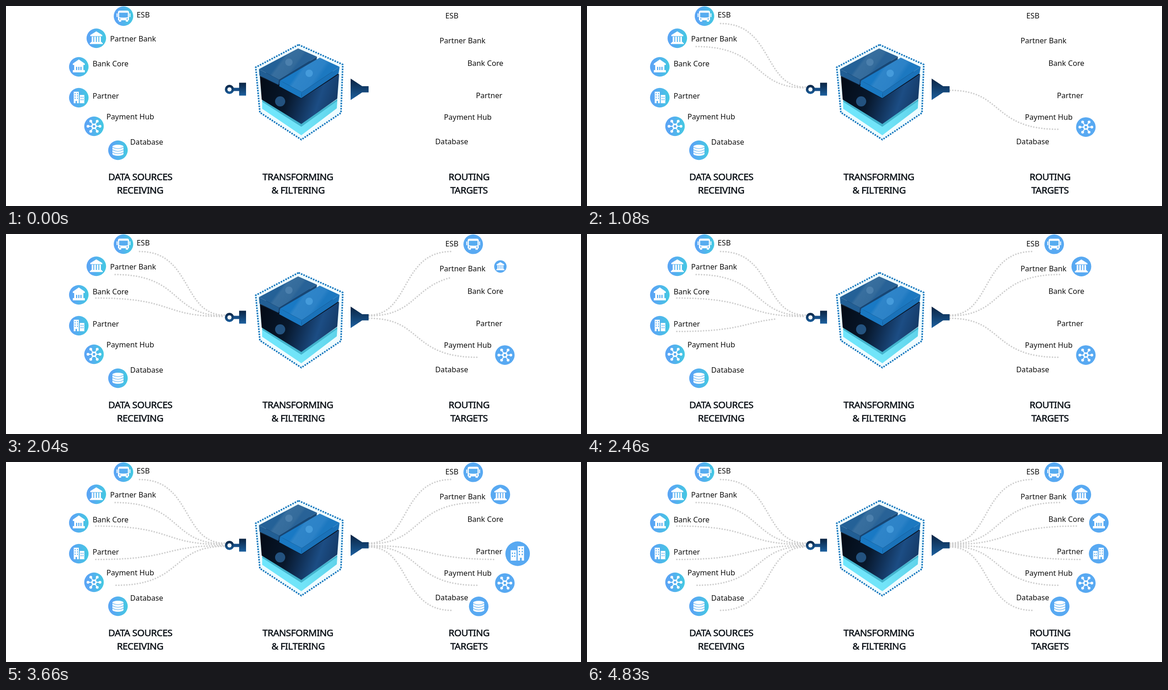
An HTML page that plays this animation: 1248x434 px, repeating every 8 s.

```html
<!DOCTYPE html>
<html lang="en">
<head>
<meta charset="utf-8">
<title>Data routing</title>
<style>
  html, body { margin: 0; width: 100%; height: 100%; overflow: hidden; background: #fff; }
  svg { display: block; width: 100%; height: 100%; }
  text { font-family: "Noto Sans", "Open Sans", sans-serif; font-size: 16.2px; fill: #111; }
  .head text { font-size: 20.4px; letter-spacing: -.45px; text-anchor: middle; fill: #0c1218; stroke: #0c1218; stroke-width: .6; }
  .line { fill: none; stroke: #cfcfcf; stroke-width: 3.5; stroke-linecap: round; }
  .w { fill: #fff; }
  .b { fill: #57acf0; }
</style>
</head>
<body>
<svg id="stage" viewBox="0 0 1248 434">
  <defs>
    <linearGradient id="disc"><stop offset=".2" stop-color="#5aa6f4"/><stop offset="1" stop-color="#44c9e2"/></linearGradient>
    <linearGradient id="navy" x2="0" y2="1"><stop offset="0" stop-color="#0a2342"/><stop offset="1" stop-color="#1c609f"/></linearGradient>
    <linearGradient id="box" gradientUnits="userSpaceOnUse" x1="552" y1="180" x2="722" y2="236">
      <stop offset="0" stop-color="#040c18"/><stop offset=".35" stop-color="#08182c"/><stop offset=".5" stop-color="#0f2c50"/>
      <stop offset=".72" stop-color="#1c4d84"/><stop offset="1" stop-color="#12335c"/>
    </linearGradient>
    <linearGradient id="slate" x2="1" y2=".4">
      <stop offset=".45" stop-color="#246197"/><stop offset=".5" stop-color="#386f9f"/><stop offset=".7" stop-color="#346b9b"/><stop offset=".75" stop-color="#286297"/>
    </linearGradient>
    <linearGradient id="azure" x2="1" y2=".4">
      <stop offset=".4" stop-color="#1979c4"/><stop offset=".46" stop-color="#2f85c9"/><stop offset=".7" stop-color="#2c82c7"/><stop offset=".78" stop-color="#1c78c0"/>
    </linearGradient>
    <linearGradient id="cyan"><stop offset="0" stop-color="#6fe6fc"/><stop offset=".55" stop-color="#72e4f8"/><stop offset="1" stop-color="#5ed3ea"/></linearGradient>

    <g id="bus">
      <path class="w" d="M-8-12H8Q12-12 12-8V9H-12V-8Q-12-12-8-12ZM-15-6h2v8h-2zM13-6h2v8h-2zM-10 9h5v3h-5zM5 9h5v3h-5z"/>
      <path class="b" d="M-9.500-7.500H9.500V2.500Q0 4-9.500 2.500Z"/>
      <circle class="b" cx="-8" cy="6" r="1.5"/><circle class="b" cx="8" cy="6" r="1.5"/>
    </g>
    <g id="bank">
      <path class="w" d="M0-15 13-7V-4.500H-13V-7ZM-10-3.500h3.500V8h-3.500zM-4.500-3.500h3.500V8h-3.500zM1-3.500h3.500V8H1zM6.500-3.500h3.500V8H6.500zM-12 8H12V10H14V12.500H-14V10H-12z"/>
    </g>
    <g id="core">
      <path class="w" d="M0-16 13-7V-4H-10V7H-13V12H13V7H10V-4H-13V-7Z"/>
      <path class="b" d="M-6 0h2.500V7h-2.500zM-1.200 0h2.500V7h-2.500zM3.500 0h2.500V7h-2.500z"/>
    </g>
    <g id="offices">
      <path class="w" d="M-11-13H0V12H-11zM2-6H12V12H2z"/>
      <path class="b" d="M-9-10h2v2.500h-2zM-4-10h2v2.500h-2zM-9-5h2v2.500h-2zM-4-5h2v2.500h-2zM-9 0h2v2.500h-2zM-4 0h2v2.500h-2zM-7 7h3v5h-3zM4-2h2v2.500H4zM8-2h2v2.500H8zM4 3h2v2.500H4zM8 3h2v2.500H8z"/>
    </g>
    <g id="hub">
      <path d="M-13 0H13M-7-11 7 11M7-11-7 11" stroke="#fff" stroke-width="2"/>
      <circle class="w" r="6"/><circle class="b" r="2.800"/>
      <g class="w"><circle cx="-13" r="3"/><circle cx="13" r="3"/><circle cx="-7" cy="-11" r="3"/><circle cx="7" cy="-11" r="3"/><circle cx="-7" cy="11" r="3"/><circle cx="7" cy="11" r="3"/></g>
    </g>
    <g id="database">
      <path class="w" d="M-12-8A12 4 0 0 1 12-8V8A12 4 0 0 1-12 8Z"/>
      <path d="M-12-6.500Q0 0 12-6.500M-12-1Q0 5.500 12-1M-12 4.500Q0 11 12 4.500" fill="none" stroke="#57acf0" stroke-width="1.200"/>
    </g>
  </defs>

  <rect width="1248" height="434" fill="#fff"/>
  <g id="lines"></g>

  <g id="connectors" fill="url(#navy)">
    <path fill-rule="evenodd" d="M475 181a10 10 0 1 1 20 0a10 10 0 1 1-20 0zM480.500 181a4.500 4.500 0 1 0 9 0a4.500 4.500 0 1 0-9 0z"/>
    <path d="M494 177.500h14v7h-14z" fill="#174f88"/>
    <path d="M506 166.500h15v28h-15z"/>
    <path d="M748 157.500 773 174H787V187.500H773L748 204z"/>
  </g>

  <g id="cube">
    <path d="M635 84 731 127 727 232 641 290 551 231 542 133Z" fill="#effcff" stroke="#1878be" stroke-width="3.400" stroke-dasharray="3.400 2.300"/>
    <path d="M556 203 641 254 719 202V208L641 265 556 211Z" fill="#43b4cd"/>
    <path d="M556 208 641 262 719 206 718 222 641 280.500 556 223Z" fill="url(#cyan)"/>
    <path d="M551 152 634 108 723 148 641 204Z" fill="#071427"/>
    <path d="M551 152 641 201 723 148 719 201 641 256 555 203Z" fill="url(#box)"/>
    <path d="M634 92 675 110 593 160 549 137Z" fill="url(#slate)"/>
    <path d="M549 137 593 160 591 171 550 151Z" fill="#215e94"/>
    <path d="M593 160 675 110 674 118 591 171Z" fill="#174776"/>
    <path d="M681 112 724 132 642 187 595 162Z" fill="url(#azure)"/>
    <path d="M595 162 642 187 641 200 593 174Z" fill="#1978c2"/>
    <path d="M642 187 724 132 722 146 641 200Z" fill="#1a72b9"/>
    <circle cx="614" cy="122" r="8" fill="#4c80ad"/>
    <circle cx="658" cy="146" r="8" fill="#459bdb"/>
    <circle cx="595" cy="207" r="11" fill="#23527f"/>
  </g>

  <g id="nodes"></g>
  <g class="head">
    <text x="291.500" y="378">DATA SOURCES</text><text x="291" y="407">RECEIVING</text>
    <text x="633.500" y="378">TRANSFORMING</text><text x="634" y="407">&amp; FILTERING</text>
    <text x="1005" y="378">ROUTING</text><text x="1005" y="407">TARGETS</text>
  </g>
</svg>
<script>
const LOOP = 8000, FRAME = 30, DOT_GAP = 5.8;

// Per node: icon, label, then [icon x, icon y, label x, label y, line x] on each side,
// the line's outer y and its y at the connector.
const nodes = [
  ['bus', 'ESB', [255, 22, 283.5, 25, 290], [1014, 22.3, 953.5, 27, 967], 38, 176],
  ['bank', 'Partner Bank', [196, 70, 226, 77, 237], [1073, 70.5, 941, 81, 1026], 88, 177.5],
  ['core', 'Bank Core', [158, 132, 188, 131, 195], [1111, 132, 1001.5, 130, 1067], 139, 179],
  ['offices', 'Partner', [158, 199, 188, 201, 195], [1110.5, 199, 1020, 200, 1075], 211.5, 181.5],
  ['hub', 'Payment Hub', [191, 261, 218, 246, 239], [1082.7, 262.7, 950.5, 247, 1023], 267.5, 183],
  ['database', 'Database', [243, 313, 269.5, 301, 290], [1026, 313.3, 931.5, 300, 968], 322, 184.5]
];
const targetOrder = [4, 0, 1, 5, 3, 2];
const sourceStarts = [0, 830, 1590, 2380, 3170, 3960];
const targetStart = step => 360 + 775 * step;

function add(parent, tag, attrs, text = '') {
  const el = document.createElementNS('http://www.w3.org/2000/svg', tag);
  for (const key in attrs) el.setAttribute(key, attrs[key]);
  el.textContent = text;
  return document.getElementById(parent).appendChild(el);
}

function addLine(outerX, outerY, hubX, hubY, fromHub) {
  const dx = hubX - outerX;
  const points = [[outerX, outerY], [outerX + dx * .62, outerY], [hubX - dx * .5, hubY], [hubX, hubY]];
  if (fromHub) points.reverse();
  const [start, ...rest] = points;
  const el = add('lines', 'path', { class: 'line', d: `M${start}C${rest.join(' ')}` });
  return { el, length: el.getTotalLength() };
}

function addIcon(icon, x, y, fill, mirror) {
  const g = add('nodes', 'g', {});
  g.innerHTML = `<circle r="21.2" fill="${fill}"/><use href="#${icon}" transform="scale(${mirror} 1)"/>`;
  const setScale = s => g.setAttribute('transform', `translate(${x} ${y}) scale(${s})`);
  setScale(1);
  return setScale;
}

const parts = nodes.map(([icon, label, left, right, outerY, hubY]) => {
  for (const side of [left, right]) add('nodes', 'text', { x: side[2], y: side[3] }, label);
  addIcon(icon, left[0], left[1], 'url(#disc)', 1);
  return {
    source: addLine(left[4], outerY, 474, hubY, false),
    target: addLine(right[4], outerY, 788, hubY, true),
    scaleTarget: addIcon(icon, right[0], right[1], '#58a9f2', -1)
  };
});

const clamp = v => Math.min(1, Math.max(0, v));
const easeOut = v => 1 - (1 - v) ** 2;

function reveal({ el, length }, elapsed, duration) {
  const progress = easeOut(clamp(elapsed / duration));
  el.style.visibility = progress > 0 ? 'visible' : 'hidden';
  el.setAttribute('stroke-dasharray', `0 ${DOT_GAP} `.repeat(Math.floor(length * progress / DOT_GAP)) + '0 9999');
}

// Grow past full size, then settle back.
function popScale(elapsed) {
  if (elapsed < 100) return 1.27 * clamp(elapsed / 100);
  return 1.27 - .27 * clamp((elapsed - 100) / 390);
}

function draw(now) {
  const t = Math.floor(now % LOOP / FRAME) * FRAME;
  targetOrder.forEach((node, step) => {
    const begin = targetStart(step);
    reveal(parts[step].source, t - sourceStarts[step], 155);
    reveal(parts[node].target, t - begin, 250);
    parts[node].scaleTarget(popScale(t - begin - 80));
  });
}

const startTime = performance.now();
function tick() {
  draw(performance.now() - startTime);
  requestAnimationFrame(tick);
}
tick();
</script>
</body>
</html>
```
